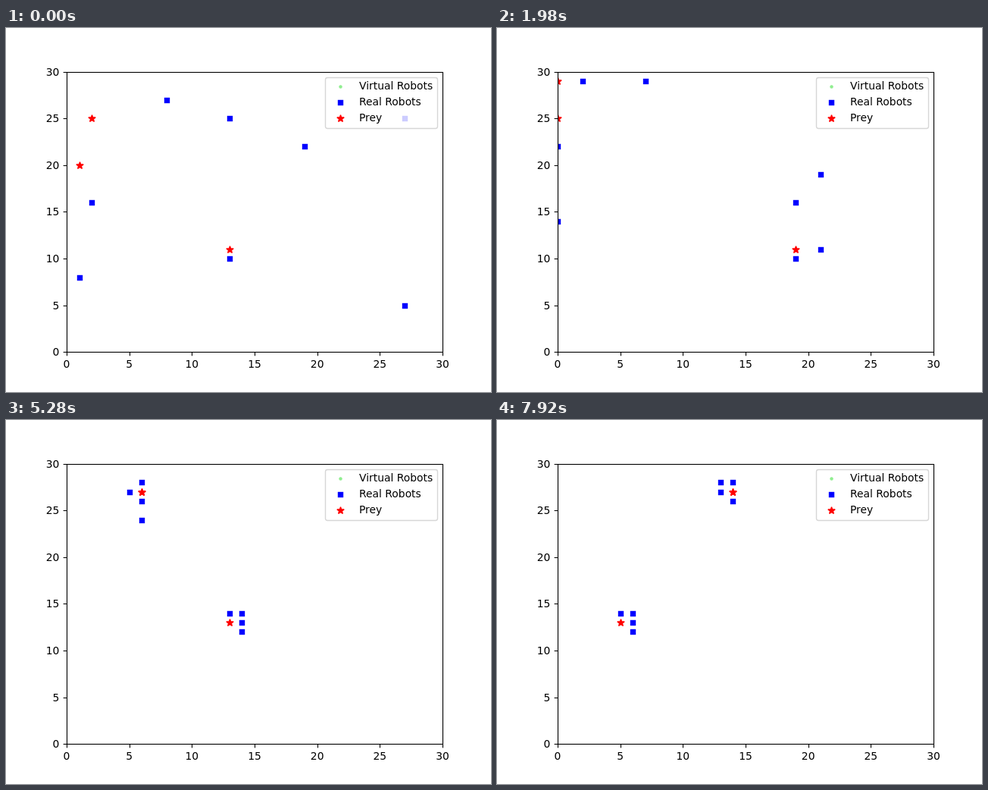
Animation, 640 px wide and 480 px high, one loop 8000 ms. Source, as an HTML page with a canvas:

```html
<!DOCTYPE html>
<html lang="en">
<head>
<meta charset="utf-8">
<title>Robots and prey</title>
<style>
  html, body { margin: 0; width: 100%; height: 100%; overflow: hidden; background: #fff; }
  canvas { display: block; }
</style>
</head>
<body>
<canvas id="stage" width="640" height="480"></canvas>
<script>
const ctx = document.getElementById('stage').getContext('2d');
const LOOP = 8000, STEP = 330;
const LEFT = 80, RIGHT = 576, TOP = 57.6, BOTTOM = 427.2, MAX = 30;
const BLUE = '#0000ff', RED = '#ff0000', GREEN = '#90ee90';

// Start cell, then compass moves with repeat counts (O = hold).
const robots = [
  trail(8, 27, 'SW2 NW5 W S E S2 E5 NE E6'),
  trail(13, 25, 'W2 NW5 SW2 W NW S E12'),
  trail(27, 25, 'SW7 S2 SW2 W13'),
  trail(19, 22, 'SW3 SE4 S O W S W13'),
  trail(2, 16, 'NW2 N8 E7 N E6'),
  trail(13, 10, 'E7 N3 SW W13'),
  trail(1, 8, 'NW N9 NE8 E6'),
  trail(27, 5, 'NW6 O N2 NW W14'),
];
const prey = [
  trail(2, 25, 'W2 N5 S2 E2 S E12'),
  trail(1, 20, 'W N7 O2 E14'),
  trail(13, 11, 'E7 N2 W15'),
];

function trail(x, y, moves) {
  const cells = [[x, y]];
  for (const [, dir, count] of moves.matchAll(/([NSEWO]+)(\d*)/g)) {
    const dx = dir.includes('E') - dir.includes('W');
    const dy = dir.includes('N') - dir.includes('S');
    for (let i = 0; i < (count || 1); i++) cells.push([x += dx, y += dy]);
  }
  return cells;
}

const snap = v => Math.floor(v + 0.5) + 0.5;
const plotX = x => LEFT + (RIGHT - LEFT) * x / MAX;
const plotY = y => BOTTOM - (BOTTOM - TOP) * y / MAX;

function square(x, y) {
  const half = 3.69;
  ctx.fillStyle = BLUE;
  ctx.fillRect(x - half, y - half, 2 * half, 2 * half);
}

function star(x, y) {
  ctx.beginPath();
  for (let i = 0; i < 10; i++) {
    const r = i % 2 ? 1.876 : 4.91, a = i * Math.PI / 5;
    ctx.lineTo(x + r * Math.sin(a), y - r * Math.cos(a));
  }
  ctx.closePath();
  ctx.fillStyle = ctx.strokeStyle = RED;
  ctx.lineWidth = 1.39;
  ctx.lineJoin = 'bevel';
  ctx.fill();
  ctx.stroke();
}

function dot(x, y) {
  ctx.beginPath();
  ctx.arc(x, y, 2.25, 0, 2 * Math.PI);
  ctx.fillStyle = GREEN;
  ctx.fill();
}

function line(x1, y1, x2, y2) {
  ctx.beginPath();
  ctx.moveTo(x1, y1);
  ctx.lineTo(x2, y2);
  ctx.stroke();
}

function label(text, x, y, align) {
  ctx.textAlign = align;
  ctx.fillText(text, x, y);
}

function drawMarkers(step) {
  ctx.save();
  ctx.beginPath();
  ctx.rect(LEFT, 58, RIGHT - LEFT, 369);
  ctx.clip();
  const place = (trails, marker) => trails.forEach(cells => {
    const [x, y] = cells[step];
    marker(snap(plotX(x)), snap(plotY(y)));
  });
  place(robots, square);
  place(prey, star);
  ctx.restore();
}

function drawAxes() {
  ctx.strokeStyle = ctx.fillStyle = '#000';
  ctx.lineWidth = 1.11;
  ctx.lineJoin = 'miter';
  const left = snap(LEFT), bottom = snap(BOTTOM), top = snap(TOP);
  ctx.strokeRect(left, top, snap(RIGHT) - left, bottom - top);
  for (let v = 0; v <= MAX; v += 5) {
    const x = plotX(v), y = plotY(v);
    line(snap(x), bottom, snap(x), bottom + 4.86);
    line(left - 4.86, snap(y), left, snap(y));
    label(v, x, 448, 'center');
    label(v, 70.3, Math.round(y + 5), 'right');
  }
}

function drawLegend() {
  ctx.beginPath();
  ctx.roundRect(421.5, 65.5, 148, 67, 2.78);
  ctx.fillStyle = 'rgba(255, 255, 255, 0.8)';
  ctx.strokeStyle = 'rgba(204, 204, 204, 0.8)';
  ctx.lineWidth = 1.39;
  ctx.fill();
  ctx.stroke();
  [[dot, 'Virtual Robots'], [square, 'Real Robots'], [star, 'Prey']].forEach(([marker, text], i) => {
    marker(441.5, 77.5 + 21 * i);
    ctx.fillStyle = '#000';
    label(text, 466, 81 + 21 * i, 'left');
  });
}

function render() {
  const step = Math.floor(performance.now() % LOOP / STEP);
  ctx.fillStyle = '#fff';
  ctx.fillRect(0, 0, 640, 480);
  ctx.font = '13.89px "DejaVu Sans", sans-serif';
  drawMarkers(step);
  drawAxes();
  drawLegend();
  requestAnimationFrame(render);
}
render();
</script>
</body>
</html>
```
